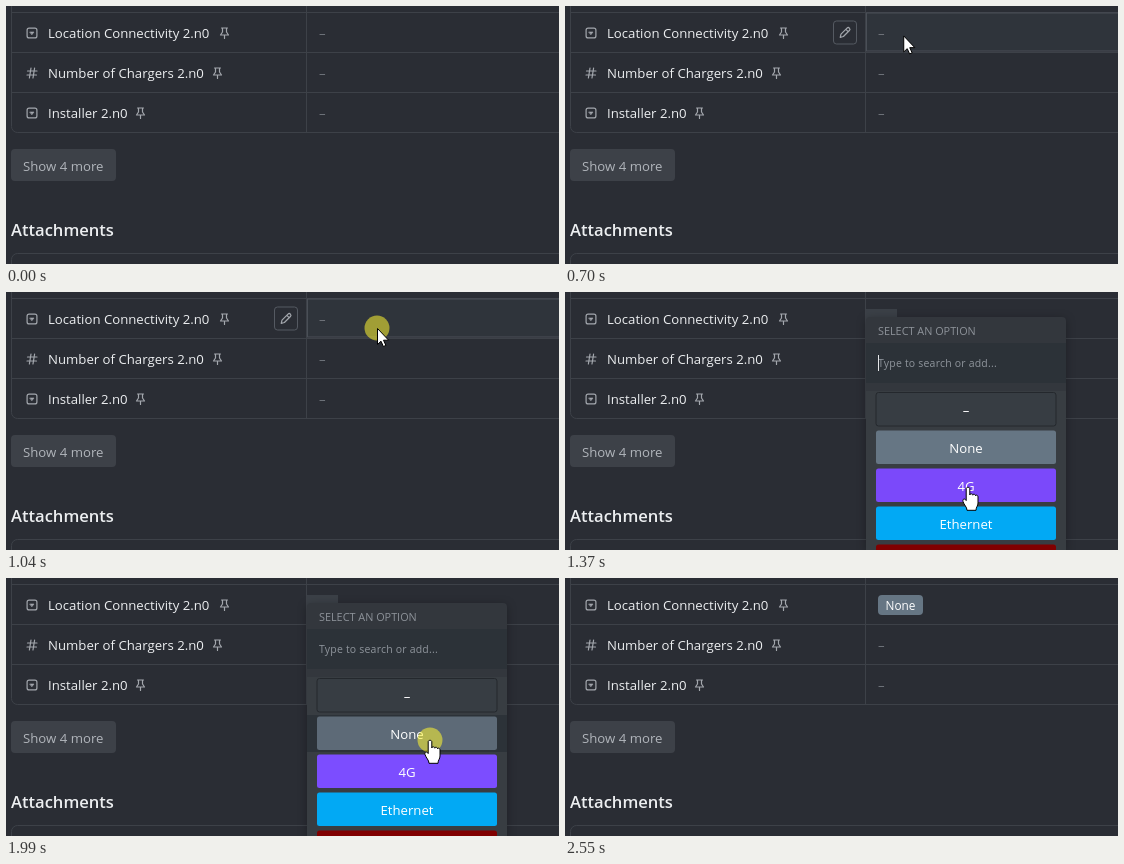
An HTML page that plays this animation: 553 px wide and 258 px high, repeating every 3740 ms.

```html
<!DOCTYPE html>
<html lang="en">
<head>
<meta charset="utf-8">
<title>Custom field picker</title>
<style>
html, body { margin: 0; width: 100%; height: 100%; overflow: hidden; background: #2a2d34; }
svg { display: block; font: 13.2px "Open Sans", "Noto Sans", sans-serif; }
.line { fill: none; stroke: #3d4148; }
.icon { fill: none; stroke: #a3a7ad; stroke-width: 1.2; stroke-linejoin: round; stroke-linecap: round; }
.label { fill: #eceef0; }
.dash { fill: #70757c; }
.mid { fill: #fff; text-anchor: middle; }
#popup { filter: drop-shadow(0 2px 5px rgba(0, 0, 0, .3)); }
.pointer { fill: #fff; stroke: #000; stroke-linejoin: round; }
</style>
</head>
<body>
<svg width="553" height="258" viewBox="0 0 553 258">
  <defs>
    <g id="pin" class="icon"><path d="M-3-5H3M-2-5V-1L-4 2H4L2-1V-5M0 2V5.5"/></g>
    <g id="list" class="icon">
      <rect x="-4.9" y="-4.9" width="9.8" height="9.8" rx="2"/>
      <path d="M-2-1H2L0 1.6Z" fill="#a3a7ad" stroke-width=".6"/>
    </g>
    <g id="number" class="icon"><path d="M-1-5L-2.6 5M2.6-5L1 5M-4.5-2H5M-5 2H4.5"/></g>
  </defs>

  <path class="line" d="M5.5 0V120.5a6 6 0 0 0 6 6H553M5.5 6.5H553M5.5 46.5H553M5.5 86.5H553M300.5 0V126"/>
  <g id="hover">
    <rect x="301.5" y="-19.5" width="260" height="38" fill="#2f343b" stroke="#4a4f57"/>
    <rect x="268.5" y="-11.5" width="23" height="23" rx="3" fill="none" stroke="#555a62"/>
    <path class="icon" transform="translate(280 0)" d="M-4.8 4.8l.8-3.2 6-6a1.6 1.6 0 0 1 2.4 2.4l-6 6zM.8-3.2l2.4 2.4"/>
  </g>
  <g id="rows"></g>

  <rect id="editing" x="301" y="17" width="31" height="20" fill="#3b4047"/>
  <g id="tag">
    <rect x="313" y="17" width="45" height="20" rx="4" fill="#667684"/>
    <text class="mid" x="335.5" y="32" font-size="11.8">None</text>
  </g>

  <rect x="5" y="143" width="105" height="32" rx="4" fill="#3d4148"/>
  <text x="17" y="165" fill="#b1b5bb">Show 4 more</text>
  <text class="label" x="5" y="230" font-size="16.6" font-weight="600">Attachments</text>
  <path class="line" d="M5.5 258V253.5a6 6 0 0 1 6-6H553"/>

  <g id="popup">
    <path d="M301 258V29a4 4 0 0 1 4-4H497a4 4 0 0 1 4 4V258Z" fill="#33373d"/>
    <path d="M301 51H501V91H301Z" fill="#2c3238"/>
    <path d="M301 99H501V258H301Z" fill="#383d42"/>
    <path id="band" d="M301 137H501V174H301Z" fill="#2c3238"/>
    <text x="313" y="43" font-size="10.85" fill="#8d9299">SELECT AN OPTION</text>
    <text x="313" y="75" font-size="10.5" letter-spacing=".2" fill="#8f959c">Type to search or add...</text>
    <path id="caret" d="M313.5 63V79" stroke="#e4e6e8"/>
    <g id="options"></g>
  </g>

  <circle id="click" r="12.5" fill="#fff532" opacity=".55"/>
  <path id="arrow" class="pointer" d="M.5.5V16.5L4 13.2 6.4 18.5 8.9 17.4 6.5 12.2H11.6Z"/>
  <path id="hand" class="pointer" d="M-1.8 1.8C-1.8-.2 1.8-.2 1.8 1.8V8c0-1.6 3-1.6 3 .2c0-1.4 2.8-1.2 2.8.6c.2-1.2 2.4-.8 2.4 1V16C10 19 8 20 8 23.3H-1C-1 20-4 18-5 14.5C-5.6 12-3.5 11-1.8 13.5Z"/>
</svg>
<script>
const LOOP = 3740;
const $ = id => document.getElementById(id);
const show = (id, on) => $(id).setAttribute('visibility', on ? 'inherit' : 'hidden');
const place = (id, x, y) => $(id).setAttribute('transform', `translate(${x} ${y})`);

const rows = [
  ['Location Connectivity 2.n0', 'list', 218.5],
  ['Number of Chargers 2.n0', 'number', 211.5],
  ['Installer 2.n0', 'list', 134.5]
];
$('rows').innerHTML = rows.map(([name, icon, pinX], i) => {
  const y = 27 + 40 * i;
  return `<use href="#${icon}" x="26" y="${y}"/>
    <text class="label" x="42" y="${y + 5}">${name}</text>
    <use href="#pin" x="${pinX}" y="${y}"/>
    <text class="dash" id="dash${i}" x="313" y="${y + 5}">–</text>`;
}).join('');

const options = [
  ['–', '#373d43'], ['None', '#667684'], ['4G', '#7c4dff'], ['Ethernet', '#02a9f4'], ['', '#800000']
];
$('options').innerHTML = options.map(([name, fill], i) => {
  const y = 100.5 + 38 * i;
  return `<rect id="option${i}" x="311" y="${y}" width="180" height="33.5" rx="2.5" fill="${fill}"
      ${i ? '' : 'stroke="#24282d"'}/>
    <text class="mid" x="401" y="${y + 22.5}">${name}</text>`;
}).join('');

const ticks = [0, 130, 200, 270, 340, 420, 490, 560, 630, 700, 770, 840, 900, 970, 1040, 1110, 1170,
  1230, 1300, 1370, 1440, 1510, 1580, 1650, 1720, 1790, 1990, 2060, 2130, 2200, 2260, 2330, 2400, 2470, 2550];

// Pointer path: time, x, y
const path = [
  [130, 352, 240], [340, 326, 80], [420, 322, 41], [490, 322, 33], [630, 330, 28], [970, 370, 35],
  [1040, 371, 36], [1110, 374, 52], [1230, 392, 140], [1370, 403, 195], [1440, 405, 203],
  [1510, 407, 201], [1650, 417, 178], [1790, 424, 162], [2130, 424, 162], [2200, 436, 160],
  [2330, 485, 154], [2470, 528, 174], [2550, 528, 174]
];

function pointerAt(t) {
  const i = Math.max(1, path.findIndex(p => p[0] >= t));
  const [t0, x0, y0] = path[i - 1], [t1, x1, y1] = path[i];
  const k = (t - t0) / (t1 - t0);
  return [x0 + (x1 - x0) * k, y0 + (y1 - y0) * k];
}

function draw(time) {
  const t = ticks.findLast(tick => tick <= time);
  const within = (a, b) => t >= a && t < b;

  const row = t < 420 ? 2 : t < 490 ? 1 : 0;
  show('hover', within(340, 1110));
  place('hover', 0, 26.5 + 40 * row + (row ? .5 : 0));

  show('popup', within(1110, 2400));
  show('caret', within(1230, 1720));
  show('band', t >= 1990);
  $('option1').setAttribute('fill', t >= 1990 ? '#5d6a77' : options[1][1]);
  $('option2').setAttribute('fill', within(1300, 1790) ? '#7b49fa' : options[2][1]);
  for (const id of ['caret', 'band']) if (!within(1110, 2400)) show(id, false);

  show('editing', within(1110, 2200));
  show('tag', t >= 2200);
  show('dash0', t < 1110);

  const visible = within(130, 2550);
  const hand = within(340, 630) || within(1230, 2200);
  show('hand', visible && hand);
  show('arrow', visible && !hand);
  show('click', within(1040, 1110) || within(1990, 2130));
  if (visible) {
    const [x, y] = pointerAt(t);
    for (const id of ['hand', 'arrow', 'click']) place(id, x, y);
  }
}

const start = performance.now();
function frame() {
  draw((performance.now() - start) % LOOP);
  requestAnimationFrame(frame);
}
frame();
</script>
</body>
</html>
```
